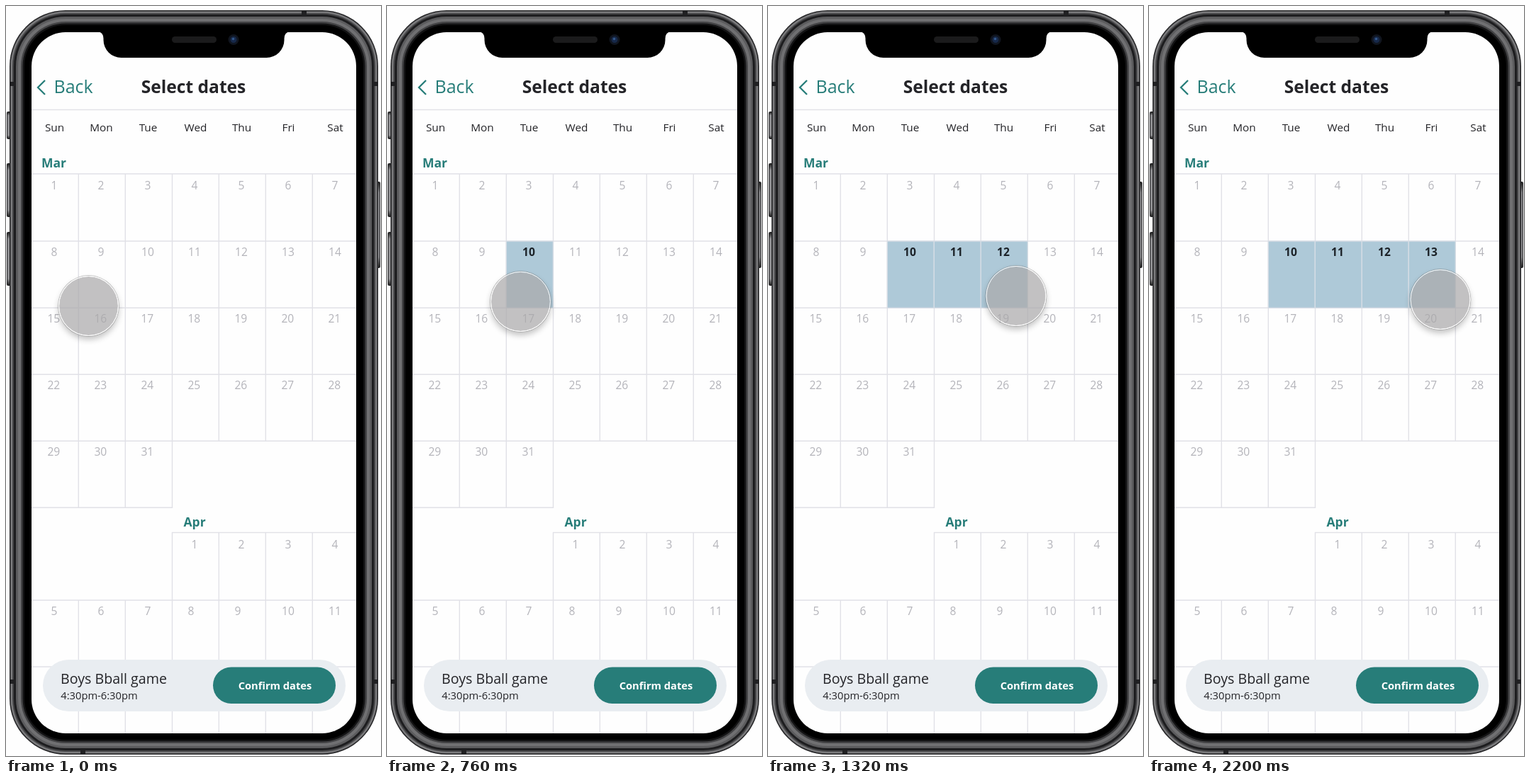
Write an HTML page that moves like this. It is 529x1059 px and loops after 2240 ms.

```html
<!DOCTYPE html>
<html lang="en">
<head>
<meta charset="utf-8">
<title>Select dates</title>
<style>
html, body { margin: 0; width: 100%; height: 100%; overflow: hidden; background: #fefefe; }
svg { position: absolute; left: 0; top: 0; display: block; }
text { font-family: "Open Sans", "Noto Sans", sans-serif; fill: #242428; }
.mid { text-anchor: middle; }
.bold { font-weight: 700; }
.teal { fill: #277d79; }
.day { font-size: 15.6px; fill: #b4b4ba; text-anchor: middle; }
.on .day { font-weight: 700; fill: #1c2228; }
.cell { fill: #aec9d8; stroke: #d6dde5; stroke-width: 1.3; visibility: hidden; }
.on .cell { visibility: visible; }
#touch {
  position: absolute; left: -42.5px; top: -42.5px; width: 85px; height: 85px;
  box-sizing: border-box; border-radius: 50%; border: 1.8px solid #fcfcfc;
  background: rgba(170, 169, 170, .7); background-clip: padding-box;
  box-shadow: 0 0 0 .9px rgba(120, 120, 120, .45), 0 5px 8px rgba(0, 0, 0, .24);
}
</style>
</head>
<body>
<svg width="529" height="1059" viewBox="0 0 529 1059">
  <defs>
    <linearGradient id="key" x1="0" x2="0" y1="0" y2="1">
      <stop offset="0" stop-color="#222"/><stop offset=".12" stop-color="#8c8c8f"/>
      <stop offset=".88" stop-color="#8c8c8f"/><stop offset="1" stop-color="#222"/>
    </linearGradient>
    <clipPath id="glass"><rect x="36" y="37" width="458" height="990" rx="48"/></clipPath>
  </defs>
  <g id="phone"></g>
  <g clip-path="url(#glass)">
    <rect x="36" y="37" width="458" height="990" fill="#fefefe"/>
    <path d="M55 105L45 115L55 125" fill="none" stroke="#277d79" stroke-width="2.3"/>
    <text class="teal" x="67.500" y="123" font-size="25">Back</text>
    <text class="mid bold" x="264.500" y="123" font-size="24.6">Select dates</text>
    <g id="week" font-size="15.3"></g>
    <text class="bold teal" x="50" y="228" font-size="17.5">Mar</text>
    <text class="bold teal" x="250.500" y="735" font-size="17.5">Apr</text>
    <path fill="none" stroke="#e1e1e7" stroke-width="1.4" d="M36 146.5H494
      M36 237H494M36 332H494M36 426.3H494M36 520.3H494M36 614.3H494M36 708.3H235.2
      M102.3 237V708M168.3 237V708M234.5 237V708M300.3 237V614M366.3 237V614M432.3 237V614
      M234 743.5H494M36 839H494M36 933H494
      M102.3 839V1027M168.3 839V1027M234.5 743V1027M300.3 743V1027M366.3 743V1027M432.3 743V1027"/>
    <g id="days"></g>
    <rect x="52" y="923" width="427" height="73" rx="36.5" fill="#e9edf1"/>
    <text x="77" y="957" font-size="19.6">Boys Bball game</text>
    <text x="77.3" y="979" font-size="14.7">4:30pm-6:30pm</text>
    <rect x="292" y="933.500" width="173" height="51.500" rx="25.7" fill="#277d79"/>
    <text class="mid bold" x="379.5" y="965" font-size="14.7" style="fill:#fff">Confirm dates</text>
  </g>
  <path d="M129 36Q137.500 37 137.500 46V48A25 25 0 0 0 162.500 73H367.500A25 25 0 0 0 392.500 48V46Q392.500 37 401 36Z" fill="#000"/>
  <rect x="234" y="43" width="63" height="9" rx="4.500" fill="#1b1b1c"/>
  <circle cx="321" cy="47.500" r="7.500" fill="#10151f"/>
  <circle cx="321" cy="47.500" r="4.500" fill="#17294a"/>
  <circle cx="320.500" cy="46.500" r="1.800" fill="#33598c"/>
</svg>
<div id="touch"></div>
<script>
const LOOP = 2240, STEP = 40;
// time, x, y of the touch centre
const path = [
  [0, 116, 423], [200, 122.500, 424], [400, 123, 424], [600, 151, 424],
  [780, 193, 416], [960, 243, 409], [1160, 307, 409], [1340, 354, 409],
  [1520, 387.500, 409], [1680, 398, 409], [1840, 403, 409], [2080, 406, 409],
  [2120, 406, 409], [2200, 410.500, 414]
];
const picks = { 10: 760, 11: 1040, 12: 1240, 13: 1440 };
const byId = id => document.getElementById(id);

function add(parent, tag, attrs, text) {
  const el = document.createElementNS("http://www.w3.org/2000/svg", tag);
  for (const k in attrs) el.setAttribute(k, attrs[k]);
  if (text !== undefined) el.textContent = text;
  parent.appendChild(el);
  return el;
}

function drawPhone() {
  const box = (x, y, width, height, rx, fill) => add(byId("phone"), "rect", { x, y, width, height, rx, fill });
  [[1, 149, 39], [1, 222, 76], [1, 319, 76], [521, 248, 122]].forEach(([x, y, h]) => {
    box(x, y, 7, h, 2, "#222224");
    box(x + 1, y + 1, 5, h - 2, 2, "url(#key)");
  });
  const shell = (inset, fill) =>
    box(5 + inset, 6 + inset, 520 - 2 * inset, 1051 - 2 * inset, 79 - inset, fill);
  shell(0, "#232325");
  shell(1.5, "#7a7a7c");
  shell(4, "#454547");
  shell(6, "#1d1d1f");
  shell(9, "#5c5c5e");
  shell(12, "#707072");
  shell(16, "#434345");
  shell(18.5, "#131314");
  shell(21, "#000");
  for (const x of [5, 516]) for (const y of [107, 951]) box(x, y, 9, 6, 0, "#202022");
  box(417, 6, 7, 8, 0, "#202022");
  box(105, 1050, 7, 7, 0, "#202022");
}

const colX = c => 68 + 66 * c;
const cells = {};

function drawDay(n, col, y, pick, dx = 0) {
  const g = add(byId("days"), "g", {});
  if (pick) {
    add(g, "rect", { class: "cell", x: 36.300 + 66 * col, y: 332.100, width: 66, height: 94.200 });
    cells[n] = g;
  }
  add(g, "text", { class: "day", x: colX(col) + dx, y }, n);
}

drawPhone();
"Sun Mon Tue Wed Thu Fri Sat".split(" ").forEach((name, c) =>
  add(byId("week"), "text", { class: "mid", x: colX(c) + (name === "Wed" ? 1.500 : .5), y: 177.300 }, name));
for (let n = 1; n <= 31; n++)
  drawDay(n, (n - 1) % 7, 259 + 94 * Math.floor((n - 1) / 7), n in picks, n > 14 ? -.7 : 0);
// The single digits under Wed and Thu sit left of their column centre
for (let n = 1; n <= 11; n++)
  drawDay(n, (n + 2) % 7, n < 5 ? 766 : 860, false, n === 8 || n === 9 ? -5 : 0);

// Slope that keeps the curve monotone between its points
function slope(i, k) {
  if (i === 0 || i === path.length - 1) return 0;
  const rate = j => (path[j + 1][k] - path[j][k]) / (path[j + 1][0] - path[j][0]);
  const a = rate(i - 1), b = rate(i);
  return a * b > 0 ? 2 * a * b / (a + b) : 0;
}

function at(t, k) {
  let i = 0;
  while (i < path.length - 2 && t >= path[i + 1][0]) i++;
  const p = path[i], q = path[i + 1], d = q[0] - p[0];
  const u = Math.min(1, (t - p[0]) / d), v = 1 - u;
  return v * v * (1 + 2 * u) * p[k] + u * u * (3 - 2 * u) * q[k]
    + d * u * v * (v * slope(i, k) - u * slope(i + 1, k));
}

const touch = byId("touch");
let start;

function render(now) {
  if (start === undefined) start = now;
  const t = Math.floor((Math.max(0, now - start) % LOOP) / STEP) * STEP;
  touch.style.transform = `translate(${at(t, 1)}px, ${at(t, 2)}px)`;
  for (const n in picks) cells[n].classList.toggle("on", t >= picks[n]);
  requestAnimationFrame(render);
}
render(performance.now());
</script>
</body>
</html>
```
